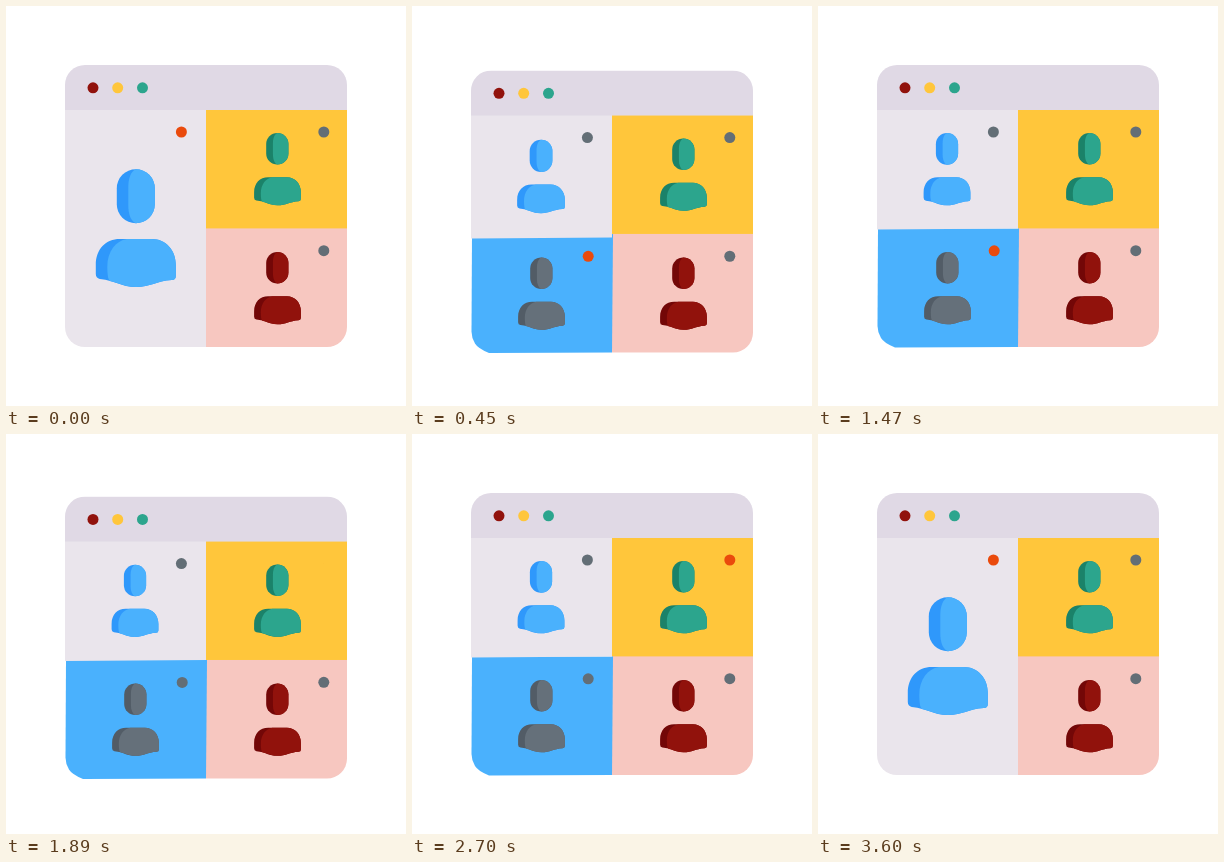
Animation of 400x400 px, one loop 4630 ms. Source, as an HTML page:

```html
<!DOCTYPE html>
<html lang="en">
<head>
<meta charset="utf-8">
<title>Video call window</title>
<style>
  html, body { margin: 0; height: 100%; overflow: hidden; background: #fff; }
  svg { display: block; width: 100vw; height: 100vh; }
</style>
</head>
<body>
<svg viewBox="0 0 400 400">
  <defs><clipPath id="frame"><rect x="59" y="59" width="282" height="282" rx="20"/></clipPath></defs>
  <g id="win"></g>
</svg>
<script>
const LOOP = 4630, MORPH = 560, SMALL = 0.585;
const ORANGE = '#ea4a0c', GRAY = '#636e76';
const $ = id => document.getElementById(id);

const HEAD = 'M0-27A19 19 0 0 1 19-8V8A19 19 0 0 1-19 8V-8A19 19 0 0 1 0-27Z';
const HEAD_LIT = 'M0-27A19 19 0 0 1 19-8V8A19 19 0 0 1 0 27C-5 25-7.5 18-7.5 9V-9C-7.5-18-5-25 0-27Z';
const RIGHT = 'H16C30-24 40-13 40 2V13Q40 17 36 17C20 18 15 24 0 24';
const BODY = `M-16-24${RIGHT}C-15 24-20 17.5-36 16Q-40 15-40 11V2C-40-14-30-24-16-24Z`;
const BODY_LIT = `M-9-24${RIGHT}C-10 24-17 20-26 18Q-28.5 16-28.5 4C-28.5-12-20-22-9-24Z`;

const place = (x, y, s) => `translate(${x} ${y}) scale(${s})`;
const part = (id, x, y, shape, lit, dark, light) =>
  `<g id="${id}" transform="${place(x, y, SMALL)}"><path d="${shape}" fill="${dark}"/><path d="${lit}" fill="${light}"/></g>`;
const person = (id, x, y, dark, light) =>
  part(id + 'Head', x, y, HEAD, HEAD_LIT, dark, light) +
  part(id + 'Body', x + 0.2, y + 42.5, BODY, BODY_LIT, dark, light);
const dot = (x, y, fill, id = '') => `<circle id="${id}" cx="${x}" cy="${y}" r="5.5" fill="${fill}"/>`;
const rect = (x, y, w, h, fill, id = '') =>
  `<rect id="${id}" x="${x}" y="${y}" width="${w}" height="${h}" fill="${fill}"/>`;

$('win').innerHTML = `
  <g clip-path="url(#frame)">
    ${rect(59, 59, 282, 46, '#e0d9e5')}
    ${rect(200, 104, 141, 119, '#ffc63b')}
    ${rect(200, 222.4, 141, 119, '#f7c7c0')}
  </g>
  ${dot(87, 81.8, '#91120c')}${dot(111.7, 81.8, '#ffc63b')}${dot(136.5, 81.8, '#2ca58d')}
  ${person('green', 271.3, 142.7, '#1b8269', '#2ca58d')}
  ${person('red', 271.3, 261.7, '#730707', '#91120c')}
  ${dot(317.8, 126, GRAY, 'dotGreen')}${dot(317.8, 244.7, GRAY)}
  <g id="lower">
    <path d="M60 222.5H201L200 341L77 341.5Q66 337 63 332Q59.5 326 59.5 320Z" fill="#4ab1fd"/>
    ${person('gray', 129.3, 261.7, '#525c66', '#65707a')}
    ${dot(176.2, 244.8, GRAY, 'dotGray')}
  </g>
  <g clip-path="url(#frame)"><path id="cell" fill="#eae5ec"/></g>
  ${person('blue', 129, 142.9, '#2f98fb', '#4ab1fd')}
  ${dot(175.4, 126, ORANGE, 'dotBlue')}`;

const clamp = v => Math.min(1, Math.max(0, v));
const mix = (a, b, p) => a + (b - a) * p;
const ease = v => (v = clamp(v)) < 0.5 ? 4 * v ** 3 : 1 - 4 * (1 - v) ** 3;

// Quick drop, slower return
const bob = (t, size) => t < 190
  ? size * ease(t / 190)
  : size * Math.cos(clamp((t - 190) / 470) * Math.PI / 2) ** 2;

// A speaker dot shrinks away and pops back as it changes colour
function setDot(id, t, on, off) {
  const active = on < off ? t >= on && t < off : t >= on || t < off;
  const gap = Math.min(Math.abs(t - on), Math.abs(t - off));
  $(id).setAttribute('fill', active ? ORANGE : GRAY);
  $(id).setAttribute('r', 5.5 * clamp(gap / 90));
}

function draw(t) {
  const p = 1 - ease(t / MORPH) + ease((t - 2700) / MORPH);
  const y = bob(t, 13.4) + bob(t - 1680, 3.6) + bob(t - 2700, 13.6);
  $('win').setAttribute('transform', `translate(0 ${y})`);

  const edge = mix(222.4, 341, p);
  $('cell').setAttribute('d', `M59 104H200V${edge}L59 ${edge + (1 - p)}Z`);
  $('lower').style.display = p > 0.999 ? 'none' : '';
  const s = mix(SMALL, 1, p);
  $('blueHead').setAttribute('transform', place(mix(129, 129.8, p), mix(142.9, 190.2, p), s));
  $('blueBody').setAttribute('transform', place(mix(129, 129.8, p), mix(185.3, 257, p), s));

  setDot('dotBlue', t, 2910, 100);
  setDot('dotGray', t, 210, 1780);
  setDot('dotGreen', t, 1890, 2800);
}

const start = performance.now();
function tick() {
  draw((performance.now() - start) % LOOP);
  requestAnimationFrame(tick);
}
tick();
</script>
</body>
</html>
```
